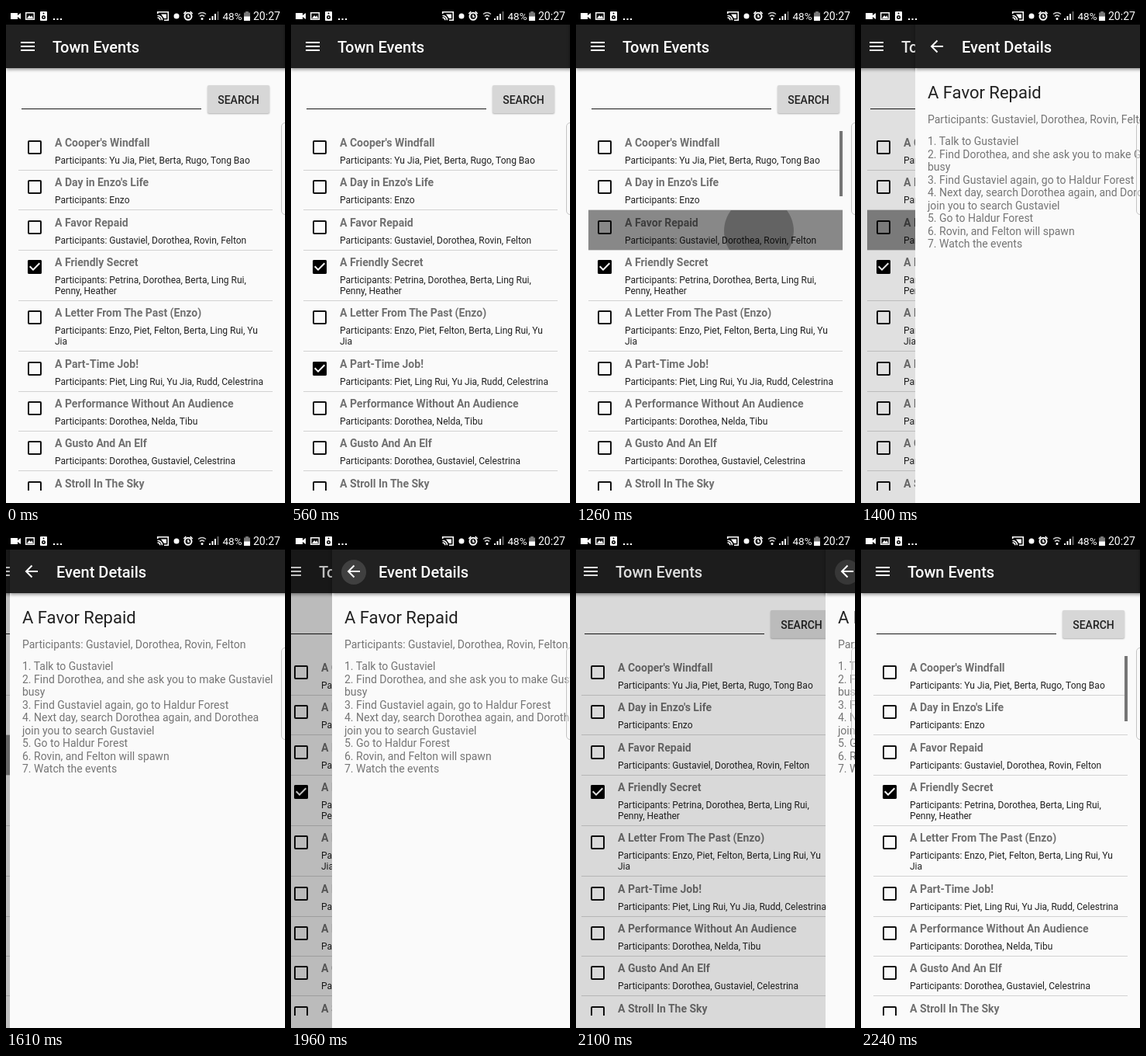
These frames come from a looping animation (360x640 px, 2310 ms). An HTML page:

```html
<!DOCTYPE html>
<html lang="en">
<head>
<meta charset="utf-8">
<title>Town Events</title>
<style>
  html, body { margin: 0; width: 100%; height: 100%; overflow: hidden; background: #fafafa; }
  #stage { position: relative; width: 360px; height: 640px; overflow: hidden; background: #fafafa;
    font-family: Roboto, "Open Sans", sans-serif; color: #212121; white-space: nowrap; }
  #stage div, #stage svg { position: absolute; box-sizing: border-box; }
  .page { left: 0; top: 0; width: 360px; height: 640px; background: #fafafa; will-change: transform; }
  .bar { left: 0; top: 0; width: 360px; height: 80px; background: #212121; box-shadow: 0 2px 4px rgba(0,0,0,.4); }
  .bar div { left: 60px; top: 41px; font: 500 20px/24px Roboto, sans-serif; color: #fff; }
  .bar svg { left: 16px; top: 40px; }
  #field { left: 20px; top: 132px; width: 232px; height: 1px; background: #1a1a1a; }
  #search { left: 260px; top: 102px; width: 80px; height: 36px; border-radius: 2px; background: #d7d7d7;
    box-shadow: 0 1px 2px rgba(0,0,0,.3); font: 500 14px/39px Roboto, sans-serif; text-align: center; }
  #list { left: 16px; top: 160.7px; width: 328px; height: 463.3px; overflow: hidden; }
  #stage #list .row { position: relative; height: 51.33px; border-bottom: 1px solid #d2d2d2; overflow: hidden; }
  #stage #list .tall { height: 65.33px; }
  .row b { position: absolute; left: 47px; top: 7.4px; font-size: 14px; line-height: 16px; color: #707070; }
  .row p { position: absolute; left: 47px; top: 31.2px; margin: 0; font-size: 12px; line-height: 14px; }
  .row svg { left: 12px; top: 12.3px; }
  #press { left: 0; top: 102.66px; width: 328px; height: 50.6px; background: rgba(0,0,0,.46); overflow: hidden; }
  #scroll { left: 324px; top: 0; width: 4px; height: 84px; background: #757575; }
  .ripple { border-radius: 50%; background: #000; }
  #stage #tapBack { background: #fff; }
  #dim { left: 0; top: 0; width: 360px; height: 640px; background: #000; }
  #details h1 { position: absolute; left: 16px; top: 98px; margin: 0; font: 400 22px/28px Roboto, sans-serif; }
  #people, #steps { left: 16px; font-size: 14px; line-height: 16.5px; color: #757575; }
  #people { top: 137.5px; }
  #steps { top: 166.3px; }
  #status { left: 0; top: 0; width: 360px; height: 24px; background: #000; color: #fff; }
  #edge { left: 355px; top: 150px; width: 12px; height: 119px; border: 1px solid #c4c4c4;
    border-radius: 5px; background: rgba(250,250,250,.5); }
</style>
</head>
<body>
<div id="stage">
  <div class="page" id="events">
    <div id="field"></div>
    <div id="search">SEARCH</div>
    <div id="list"></div>
    <div class="ripple" id="tapCheck"></div>
    <div class="bar">
      <svg width="24" height="24"><path d="M3 7h18M3 12h18M3 17h18" stroke="#fff" stroke-width="2"/></svg>
      <div>Town Events</div>
    </div>
  </div>
  <div id="dim"></div>
  <div class="page" id="details">
    <h1>A Favor Repaid</h1>
    <div id="people">Participants: Gustaviel, Dorothea, Rovin, Felton</div>
    <div id="steps">1. Talk to Gustaviel<br>2. Find Dorothea, and she ask you to make Gustaviel<br>busy<br>3. Find Gustaviel again, go to Haldur Forest<br>4. Next day, search Dorothea again, and Dorothea<br>join you to search Gustaviel<br>5. Go to Haldur Forest<br>6. Rovin, and Felton will spawn<br>7. Watch the events</div>
    <div class="bar">
      <div class="ripple" id="tapBack"></div>
      <svg width="24" height="24"><path d="M20 12H5.5M12.5 4.5L5 12l7.5 7.5" fill="none" stroke="#fff" stroke-width="2"/></svg>
      <div>Event Details</div>
    </div>
  </div>
  <div id="status">
    <svg width="360" height="24" fill="#fff" stroke="none" font-family="Roboto, sans-serif">
      <path d="M6 9h9v8H6zM15 12l4-3v8l-4-3z"/>
      <path d="M25.7 8.7h10.6v8.6H25.7z" fill="none" stroke="#fff" stroke-width="1.4"/>
      <path d="M27 16l3-4 2 2 1.5-2L35 16z"/>
      <rect x="44" y="7" width="9" height="12" rx="1"/>
      <circle cx="48.5" cy="14.5" r="2.5" fill="#000"/><circle cx="48.5" cy="14.5" r="1"/>
      <circle cx="48.5" cy="9.5" r="1" fill="#000"/>
      <path d="M61 16h2v2h-2zM65.5 16h2v2h-2zM70 16h2v2h-2z"/>
      <g fill="none" stroke="#fff" stroke-width="1.6">
        <path d="M195.7 10V7.7h13.6v10.6H204M195.5 12.3a6 6 0 0 1 6 6M195.5 15a3.3 3.3 0 0 1 3.3 3.3"/>
        <circle cx="235" cy="13.3" r="4.5" stroke-width="2"/>
        <path d="M235 11v3h2M229.3 10l3-2.8M240.7 10l-3-2.8"/>
        <path d="M248 10.5q5-4 10 0M250 13.3q3-2.5 6 0" stroke="#ccc"/>
      </g>
      <path d="M200 10.500h7v5.500h-3z"/>
      <circle cx="220" cy="13" r="3.5"/>
      <circle cx="253" cy="16.5" r="1.5"/>
      <path d="M262 16h2v2h-2zM265.500 13h2v5h-2zM269 10h2v8h-2z"/>
      <path d="M272.500 7h2v11h-2z" fill="#666"/>
      <text x="279.5" y="17.5" font-size="13.500">48%</text>
      <path d="M309 7h4v1.500h2V19h-8V8.500h2z" fill="#777"/><path d="M307 13.500h8V19h-8z"/>
      <text x="319" y="17.5" font-size="14">20:27</text>
    </svg>
  </div>
  <div id="edge"></div>
</div>
<script>
  const LOOP = 2310, STEP = 70;
  const $ = id => document.getElementById(id);

  const events = [
    ["A Cooper's Windfall", "Yu Jia, Piet, Berta, Rugo, Tong Bao"],
    ["A Day in Enzo's Life", "Enzo"],
    ["A Favor Repaid", "Gustaviel, Dorothea, Rovin, Felton"],
    ["A Friendly Secret", "Petrina, Dorothea, Berta, Ling Rui,<br>Penny, Heather"],
    ["A Letter From The Past (Enzo)", "Enzo, Piet, Felton, Berta, Ling Rui, Yu<br>Jia"],
    ["A Part-Time Job!", "Piet, Ling Rui, Yu Jia, Rudd, Celestrina"],
    ["A Performance Without An Audience", "Dorothea, Nelda, Tibu"],
    ["A Gusto And An Elf", "Dorothea, Gustaviel, Celestrina"],
    ["A Stroll In The Sky", "Berta, Rudd"]
  ];

  const box = `<svg width="18" height="18">
    <rect x="1" y="1" width="16" height="16" rx="1" fill="none" stroke="#111" stroke-width="2"/>
    <g class="tick"><rect width="18" height="18" rx="2" fill="#000"/>
    <path d="M7 14L2 9l1.4-1.4L7 11.2l7.6-7.6L16 5z" fill="#fff"/></g></svg>`;

  $("list").innerHTML = events.map(([title, people]) =>
    `<div class="row${people.includes("<br>") ? " tall" : ""}">${box}<b>${title}</b><p>Participants: ${people}</p></div>`
  ).join("") + '<div id="press"><div class="ripple" id="tapRow"></div></div><div id="scroll"></div>';

  const ticks = [...document.querySelectorAll(".tick")];
  const show = (el, on) => el.style.visibility = on ? "visible" : "hidden";

  // Linear interpolation through [step, value] points
  function track(n, points) {
    const i = points.findIndex(p => p[0] >= n);
    if (i < 0) return points[points.length - 1][1];
    if (i === 0) return points[0][1];
    const [a, from] = points[i - 1], [b, to] = points[i];
    return from + (to - from) * (n - a) / (b - a);
  }

  function ripple(id, x, y, r, alpha) {
    Object.assign($(id).style, {
      left: x - r + "px", top: y - r + "px", width: 2 * r + "px", height: 2 * r + "px", opacity: alpha
    });
  }

  function draw(n) {
    ticks.forEach((tick, i) => show(tick, i === 3 || (i === 5 && n >= 3 && n < 11)));

    // Checkbox taps: one ticks the row, the next clears it
    const second = n > 8, k = second ? n - 8 : n;
    ripple("tapCheck", 37, 467,
      track(k, [[0, 0], [1, 8], [4, second ? 20 : 18]]),
      track(k, [[0, 0], [1, .22], [4, .22], [8, 0]]));

    show($("scroll"), n >= 15);
    const pressed = n >= 17 && n < 24;
    show($("press"), pressed);
    show($("tapRow"), pressed);
    $("press").style.opacity = n === 17 ? .6 : 1;
    ripple("tapRow", 220, 27, track(n, [[17, 25], [18, 45], [20, 85]]),
      track(n, [[18, .27], [20, 0]]));

    // Details page slides in over the list, then back out
    const x = track(n, [[18, 360], [19, 195], [20, 70], [21, 30], [22, 13], [23, 5], [24, 0],
      [27, 0], [28, 53], [29, 210], [30, 322], [31, 352], [32, 360]]);
    const shift = track(n, [[18, 0], [19, -3], [20, -8], [24, -28], [27, -28], [28, -24], [30, -9], [32, 0]]);
    $("details").style.transform = `translateX(${x}px)`;
    $("events").style.transform = `translateX(${shift}px)`;
    $("dim").style.opacity = track(n, [[18, 0], [20, .1], [24, .28], [27, .28], [28, .25], [30, .13], [32, 0]]);

    ripple("tapBack", 28, 53, 16, n >= 28 ? track(n, [[28, .14], [30, .1], [32, 0]]) : 0);
  }

  function tick() {
    draw(Math.floor(performance.now() % LOOP / STEP));
    requestAnimationFrame(tick);
  }
  tick();
</script>
</body>
</html>
```
